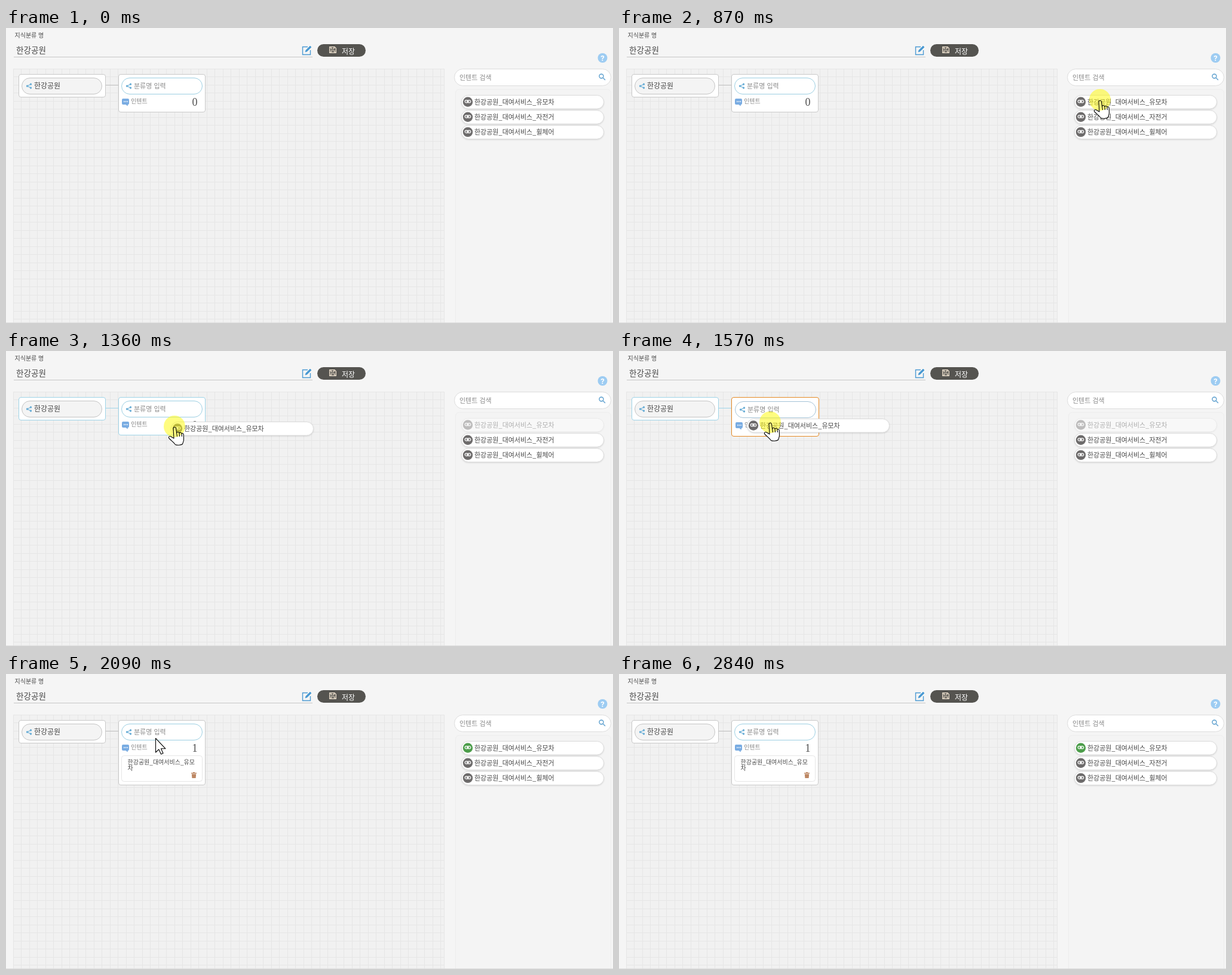
An HTML page that plays this animation: 1016 by 493 pixels, repeating every 3.64 s.

```html
<!DOCTYPE html>
<html lang="ko">
<head>
<meta charset="utf-8">
<title>지식분류</title>
<style>
  html, body { margin: 0; width: 100%; height: 100%; overflow: hidden; background: #f5f5f5; }
  svg { display: block; width: 1016px; height: 493px; }
  text { font-family: "Noto Sans CJK KR", "Noto Sans CJK", "Noto Sans KR", sans-serif; font-size: 11px; fill: #484848; }
  .hint { fill: #8a8a8a; }
  .count { font: 18px "Liberation Serif", serif; fill: #505050; text-anchor: middle; }
  .box { fill: #fff; stroke: #c9c9c9; }
  .pill { fill: #f4f4f4; stroke: #c4c4c4; }
  .entry { stroke: #9ccfe2; fill: #fff; }
  .link { stroke: #bcbcbc; }
  .drag .box, .drag .link { stroke: #9fd4e8; }
  .over #node .box { stroke: #e58a24; }
  .over #node .entry { stroke: #a5c3d6; }
  .shade { filter: drop-shadow(0 1px 1px rgba(0, 0, 0, .13)); }
  .line { fill: none; stroke: #000; stroke-width: 1.1; stroke-linejoin: round; }
</style>
</head>
<body>
<svg id="stage" viewBox="0 0 1016 493">
  <defs>
    <g id="share" fill="#68add6" stroke="#68add6">
      <path d="M3 -3L-3 0L3 3" fill="none" stroke-width="1.1"/>
      <g stroke="none"><circle cx="3" cy="-3" r="1.7"/><circle cx="-3" r="1.7"/><circle cx="3" cy="3" r="1.7"/></g>
    </g>
    <g id="chain" fill="none" stroke="#fff" stroke-width="1.2">
      <rect x="-4.8" y="-2.3" width="5.4" height="4.2" rx="2.1"/>
      <rect x="-.6" y="-2.3" width="5.4" height="4.2" rx="2.1"/>
      <path d="M-2.4 -.2H2.4"/>
    </g>
    <path id="hand" d="M-2 3.5C-2 .5 2 .5 2.4 3L3.6 11c.5-2 4-2 4.4.4c.8-1.8 3.6-1.4 4 .8c1-1.2 3-.6 3.2 1.2L15.5 21c.2 4-1.6 6-2 8.500C11 31.700 4 31.700 1.500 30.500C-1 27-5 24-9 20c-2-2.500 1-4.200 3-3l5 3Z"/>
  </defs>

  <text x="14.500" y="16" style="font-size:10px">지식분류 명</text>
  <text x="17" y="42" style="font-size:13.600px">한강공원</text>
  <path d="M13 48.500H513" stroke="#c6c6c6"/>
  <g fill="none" stroke="#4b9ad3" stroke-width="1.400">
    <path d="M505 31.500H496.500V44.500H509.500V37"/>
    <path d="M501 40L502 37L509 30L511 32L504 39Z" fill="#4b9ad3" stroke-width=".8"/>
  </g>
  <rect x="521" y="27" width="81" height="21" rx="10.500" fill="#555450"/>
  <path d="M541.700 31.700H550L552.300 34V41.300H541.700ZM544 31.700V35H549V31.700M544 41V38H550V41" fill="none" stroke="#fff0dc" stroke-width="1.200"/>
  <text x="562" y="43.500" style="font-size:12px;font-weight:500;fill:#fff">저장</text>
  <circle cx="998.500" cy="50" r="8" fill="#9dccf2"/>
  <text x="998.500" y="54.500" text-anchor="middle" style="font:bold 13px Roboto,sans-serif;fill:#fff">?</text>

  <rect x="12" y="68" width="722" height="425" fill="#f1f1f1"/>
  <path id="grid" fill="none" stroke="#e6e6e6"/>

  <rect x="750.500" y="68.500" width="262" height="28" rx="14" fill="#fff" stroke="#dcdcdc"/>
  <text class="hint" x="759" y="87">인텐트 검색</text>
  <path d="M999.500 83.500L1003 87M1000 80.500a3.500 3.500 0 1 1-7 0a3.500 3.500 0 1 1 7 0" fill="none" stroke="#5c9fce" stroke-width="1.400"/>
  <rect x="752.500" y="102.500" width="260" height="400" rx="6" fill="#f4f4f4" stroke="#ededed"/>
  <path d="M0 492.500H1016" stroke="#dedede"/>
  <g id="list"></g>

  <path class="link" d="M167 95.500H188"/>
  <rect class="box" x="21.500" y="77.500" width="145" height="38" rx="3.500"/>
  <rect class="pill" x="26.500" y="83.500" width="134" height="27" rx="13.500"/>
  <use href="#share" x="38.500" y="97"/>
  <text x="47" y="101.300" style="font-size:12px">한강공원</text>

  <g id="node">
    <rect id="frame" class="box" x="188.500" y="77.500" width="145" height="63" rx="3.500"/>
    <g id="body">
      <rect class="pill entry" x="193.500" y="83.500" width="135" height="27" rx="13.500"/>
      <use href="#share" x="205.500" y="97"/>
      <text class="hint" x="214" y="101">분류명 입력</text>
      <path d="M196 118H204Q206 118 206 120V126Q206 128 204 128L203.500 130.500L200.500 128H196Q194 128 194 126V120Q194 118 196 118Z" fill="#79ace2"/>
      <path d="M197 123H204" stroke="#fff" stroke-width="1.600" stroke-dasharray="1.600 1.100"/>
      <text class="hint" x="209" y="126.300" style="font-size:10px">인텐트</text>
      <text id="count" class="count" x="316" y="130">0</text>
    </g>
    <g id="card">
      <rect x="193.500" y="136.500" width="135" height="43" rx="4" fill="#fff" stroke="#e6e6e6"/>
      <text x="203.500" y="151" style="font-size:10px">한강공원_대여서비스_유모</text>
      <text x="203.500" y="161" style="font-size:10px">차</text>
      <path d="M310 165H313V164H316V165H319V166.500H310ZM310.800 167.300H318.200L317.600 174H311.400Z" fill="#bd8763"/>
    </g>
  </g>

  <g id="ghost"></g>
  <g id="pointer">
    <g id="grab">
      <use href="#hand" fill="#fff"/>
      <circle id="glow" r="18" fill="#fffa14" fill-opacity=".54"/>
      <use href="#hand" class="line"/>
      <path class="line" d="M3.600 11L4.500 17M8 11.500L8.500 17M12 12.500L12.300 17"/>
    </g>
    <path id="arrow" class="line" style="fill:#fff" d="M.5 .5V24L5.800 19L9.500 27L13 25.500L9.500 17.800H17Z"/>
  </g>
</svg>
<script>
const $ = id => document.getElementById(id);
const LOOP = 3640, START = performance.now();
const GRAB = 870, DRAG = 940, OVER = 1430, DROP = 2090, GONE = 2840;

// Pointer poses, each held until the next: time, x, y
const poses = [
  [70, 976, 468], [140, 968, 430], [200, 945, 360], [270, 907, 277],
  [340, 866, 208], [400, 836, 162], [470, 816, 132], [530, 806, 120], [600, 805, 120],
  [940, 745, 122], [1010, 615, 126], [1080, 550, 126], [1150, 475, 126],
  [1220, 395, 126], [1290, 319, 126], [1360, 282, 126], [1430, 264, 124],
  [1500, 257, 121], [1570, 253, 119], [1630, 251, 112], [1700, 250, 107],
  [2430, 246, 125], [2500, 235, 165], [2570, 220, 215], [2640, 204, 275],
  [2710, 190, 330], [2770, 179, 367]
];

const item = name => `
  <rect class="shade" x=".5" y="-11.500" width="238" height="22.500" rx="11.250" fill="#fff" stroke="#dcdcdc"/>
  <circle class="badge" cx="11" cy="-.5" r="8.200" fill="#6d6b6b"/>
  <use href="#chain" x="11" y="-1"/>
  <text x="22" y="4">한강공원_대여서비스_${name}</text>`;

$('list').innerHTML = ['유모차', '자전거', '휠체어']
  .map((name, i) => `<g transform="translate(762 ${124 + i * 25.2})">${item(name)}</g>`).join('');
$('ghost').innerHTML = item('유모차');
const first = $('list').firstElementChild;
const badge = first.querySelector('.badge');

let grid = '';
for (let i = 0; i < 54; i++) grid += `M${Math.floor(12 + i * 13.5) + .5} 68V492`;
for (let i = 0; i < 32; i++) grid += `M12 ${Math.floor(68 + i * 13.5) + .5}H734`;
$('grid').setAttribute('d', grid + 'M733.5 68V492');

const show = (id, on) => $(id).style.display = on ? '' : 'none';
const move = (id, x, y) => $(id).setAttribute('transform', `translate(${x} ${y})`);

function draw() {
  const t = (performance.now() - START) % LOOP;
  const drag = t >= DRAG && t < DROP, over = drag && t >= OVER, done = t >= DROP;
  const hand = t >= 400 && !done;
  const i = poses.findLastIndex(p => p[0] <= t);

  show('pointer', i >= 0 && t < GONE);
  show('grab', hand);
  show('glow', t >= GRAB);
  show('arrow', !hand);
  if (i >= 0) move('pointer', poses[i][1], poses[i][2]);

  // The dragged item trails the hand by one step
  show('ghost', drag);
  if (drag) move('ghost', poses[i - 1][1] - 43, poses[i - 1][2] + 4);

  $('stage').setAttribute('class', (drag ? 'drag ' : '') + (over ? 'over' : ''));
  first.style.opacity = drag ? .4 : 1;
  badge.setAttribute('fill', done ? '#4c9d4a' : '#6d6b6b');
  $('frame').setAttribute('width', over ? 146 : 145);
  $('frame').setAttribute('height', done ? 108 : over ? 65 : 63);
  move('body', over ? 1 : 0, over ? 1 : 0);
  $('count').textContent = done ? 1 : 0;
  show('card', done);
  requestAnimationFrame(draw);
}
draw();
</script>
</body>
</html>
```
